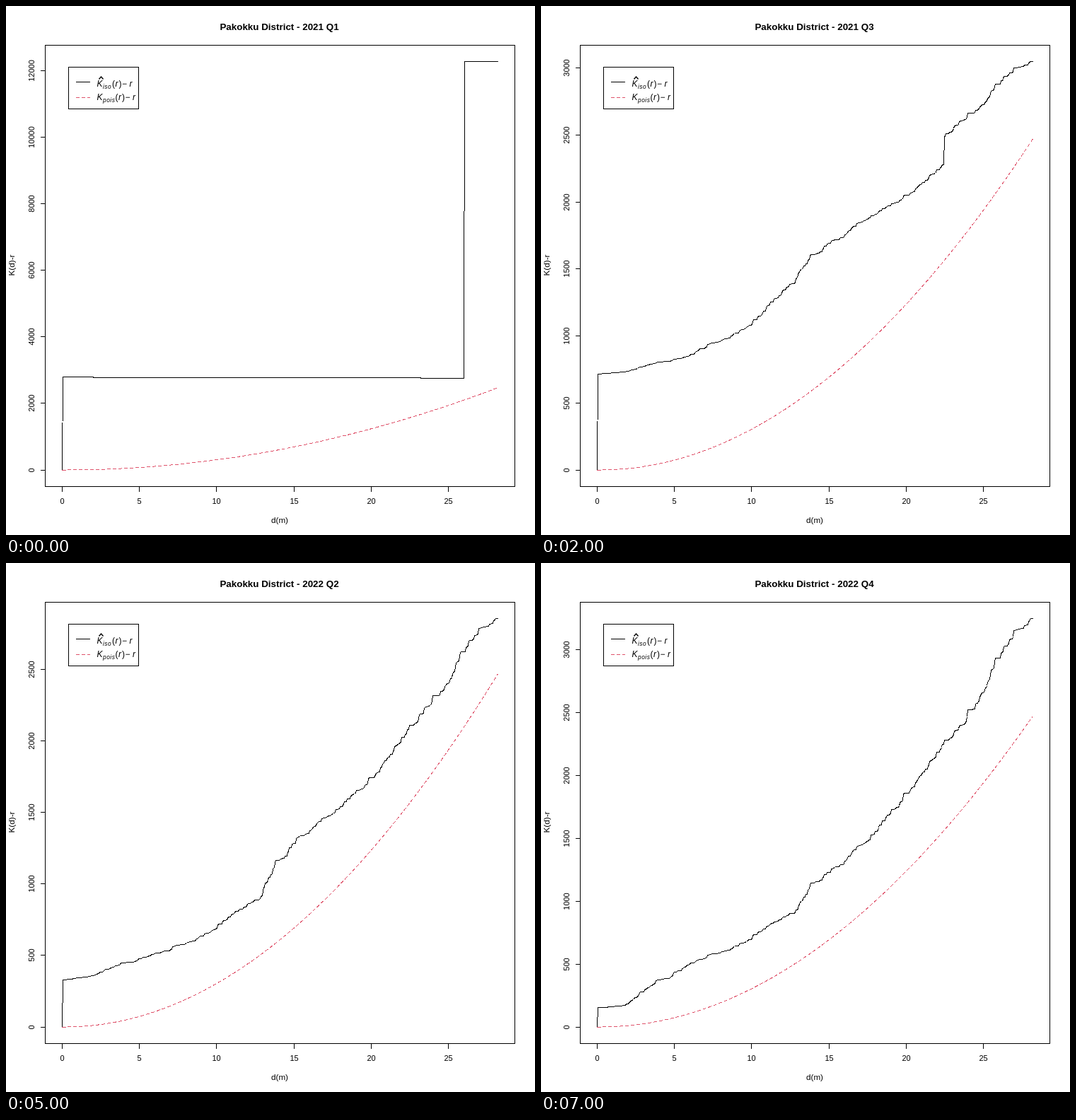
Recreate the animation shown at these times as an HTML page. Size 748 by 748 pixels, loop 8000 ms.

```html
<!DOCTYPE html>
<html lang="en">
<head>
<meta charset="utf-8">
<style>
  html, body { margin: 0; width: 100%; height: 100%; overflow: hidden; background: #fff; }
  svg { display: block; font: 11px "Liberation Sans", Arial, sans-serif; }
  path { fill: none; stroke: #000; shape-rendering: crispEdges; }
  .pois { stroke: #df536b; stroke-dasharray: 5 3; }
  .hat { shape-rendering: auto; stroke-width: 1.4; }
  .mid { text-anchor: middle; }
  .title { font-size: 13.4px; font-weight: bold; }
  .label { font-size: 11.7px; }
  .math { font-size: 12px; }
  .italic { font-style: italic; }
  .sub { font-size: 8.4px; letter-spacing: .5px; }
</style>
</head>
<body>
<svg id="stage" width="748" height="748" viewBox="0 0 748 748"></svg>
<script>
const LEFT = 79.5, BASE = 656, HEIGHT = 577.8, PER_METRE = 21.84;
const R_MAX = 28.2, SAMPLES = 512, DR = R_MAX / SAMPLES;

// keys: [distance, K]. Sparse quarters jump at each key, busy ones climb between keys.
const quarters = [
  { name: '2021 Q1', tick: 2000, sparse: true, keys: [[0, 2785], [26.05, 12275]] },
  { name: '2021 Q2', sparse: true, keys: [[0, 1044], [9.9, 1066], [10.75, 1102], [11.15, 1460],
    [13.9, 1524], [15.05, 1616], [17.85, 1813], [20.8, 2003], [22.5, 2588], [26.25, 2600]] },
  { name: '2021 Q3', keys: [[0, 715], [6, 850], [10.6, 1150], [15, 1690], [22.4, 2280],
    [22.6, 2510], [28.2, 3050]] },
  { name: '2021 Q4', keys: [[0, 555], [3.1, 604], [5.75, 848], [5.8, 982], [10, 1420],
    [10.7, 1611], [13, 1818], [15.2, 2190], [22.5, 2678], [22.6, 2807], [28, 3350], [28.2, 3526]] },
  { name: '2022 Q1', keys: [[0, 518], [6.2, 645], [11, 863], [13, 1005], [16.1, 1540],
    [17.8, 1630], [20.3, 2020], [23, 2330], [25.1, 2464], [28.2, 2881]] },
  { name: '2022 Q2', keys: [[0, 330], [6.6, 530], [12.9, 915], [15.3, 1330], [17.7, 1500],
    [23, 2140], [28.2, 2860]] },
  { name: '2022 Q3', keys: [[0, 152], [2, 162], [7.8, 534], [12.9, 847], [13.7, 1009],
    [18.9, 1503], [23.7, 2013], [25.9, 2302], [26.1, 2473], [27.4, 2625], [28.2, 2830]] },
  { name: '2022 Q4', keys: [[0, 152], [1.5, 168], [6.7, 539], [13, 944], [14.3, 1157],
    [17.7, 1489], [20.1, 1860], [23.7, 2404], [25, 2657], [26.5, 3028], [28.2, 3247]] },
];

const line = (d, cls = '') => `<path class="${cls}" d="${d}"/>`;
const text = (x, y, str, cls) => `<text x="${x}" y="${y}" class="${cls}">${str}</text>`;
const upright = (x, y, str, cls) =>
  `<g transform="translate(${x} ${y}) rotate(-90)">${text(0, 0, str, cls)}</g>`;

// After a jump K stays put, so K - r sinks by one per metre.
function jumps(keys) {
  return Array.from({ length: SAMPLES + 1 }, (_, i) => {
    const r = i * DR;
    const [start, k] = keys.findLast(key => key[0] <= r);
    return i && k - (r - start);
  });
}

// Many small uneven rises that together reach each key.
function climb(keys) {
  let seed = 11;
  const random = () => (seed = seed * 16807 % 2147483647) / 2147483647;
  let k = keys[0][1];
  const values = [0, k];
  for (const [r, goal] of keys.slice(1)) {
    const count = Math.max(1, Math.round(r / DR) + 1 - values.length);
    const rises = Array.from({ length: count }, () => random() ** 4);
    const unit = (goal - k) / rises.reduce((a, b) => a + b);
    for (const rise of rises) values.push(k += rise * unit);
  }
  return values;
}

const poisson = Array.from({ length: SAMPLES + 1 }, (_, i) => Math.PI * (i * DR) ** 2 - i * DR);

const plot = (values, scale, snap = v => v) => 'M' + values.map((k, i) =>
  `${snap(LEFT + i * DR * PER_METRE)} ${snap(BASE - k * scale)}`).join('L');

function legendText(y, sub, x) {
  return text(128.5, y, 'K', 'math italic') + text(137, y + 3, sub, 'sub italic') +
    text(x, y, '(', 'math') + text(x + 4.5, y, 'r', 'math italic') + text(x + 9.5, y, ')', 'math') +
    text(x + 14, y, '−', 'math') + text(x + 24.5, y, 'r', 'math italic');
}

function chart({ name, keys, sparse, tick = 500 }) {
  const max = keys.at(-1)[1], scale = HEIGHT / max;
  let lines = line('M55 55H719V679H55Z') + line('M88 86H187V145H88Z') +
    line('M98 107H118') + line('M98 129H118', 'pois');
  let labels = text(386.5, 33.5, `Pakokku District - ${name}`, 'mid title') +
    text(387, 731, 'd(m)', 'mid label') + upright(12, 366.5, 'K(d)-r', 'mid label') +
    legendText(114, 'iso', 150) + legendText(133, 'pois', 154.5) +
    line('M131.5 103.5L134.5 100L137.5 103.5', 'hat');
  for (let d = 0; d <= 25; d += 5) {
    const x = Math.floor(LEFT + d * PER_METRE);
    lines += line(`M${x} 679v7`);
    labels += text(x + .5, 704, d, 'mid');
  }
  for (let k = 0; k <= max; k += tick) {
    const y = Math.floor(BASE - k * scale);
    lines += line(`M55 ${y}h-7`);
    labels += upright(39.5, y + .5, k, 'mid');
  }
  lines += line(plot(sparse ? jumps(keys) : climb(keys), scale, Math.floor));
  return `<g transform="translate(.5 .5)">${lines}</g>` + line(plot(poisson, scale), 'pois') + labels;
}

const stage = document.getElementById('stage');
const charts = quarters.map(chart);
let shown = -1;

function tick() {
  const now = Math.floor(performance.now() / 1000) % charts.length;
  if (now !== shown) stage.innerHTML = charts[shown = now];
  requestAnimationFrame(tick);
}
tick();
</script>
</body>
</html>
```
